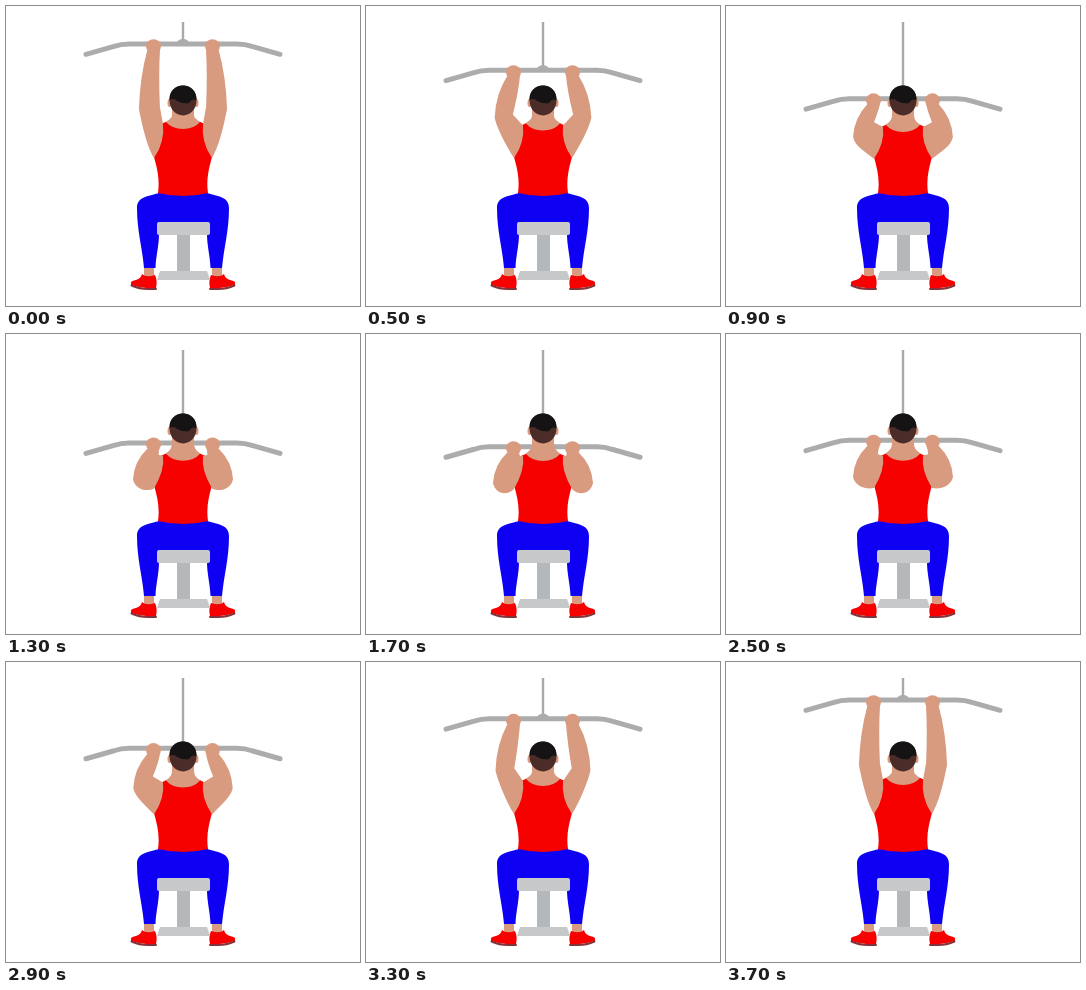
Write an HTML page that moves like this. It is 354x300 px and loops after 3.8 s.

```html
<!DOCTYPE html>
<html lang="en">
<head>
<meta charset="utf-8">
<title>Lat pulldown</title>
<style>
  html, body { margin: 0; width: 100%; height: 100%; overflow: hidden; background: #fff; }
  svg { display: block; width: 100%; height: 100%; }
  .skin { fill: #d99b7f; }
  .red { fill: #f60000; }
  .blue { fill: #0e00f2; }
  .metal { fill: #c6c8ca; }
</style>
</head>
<body>
<svg viewBox="0 0 354 300">
  <path id="cable" stroke="#aaa" stroke-width="2.400"/>
  <g id="bar">
    <path d="M80 10L108 2Q115 -.4 123 -.4H231Q239 -.4 246 2L274 10" fill="none" stroke="#acacac" stroke-width="5" stroke-linecap="round"/>
    <path d="M170.500 0C171-7 183-7 183.500 0Z" fill="#acacac"/>
  </g>

  <g id="leg">
    <path class="skin" d="M138 260H148V273H138Z"/>
    <path class="red" d="M125 276C129 273 134 275 136 268Q140 272 149 269C151 273 151 278 150 282H140Q131 281 125 279Z"/>
    <path d="M125.500 279.500Q133 283 142 283H150" fill="none" stroke="#85343a" stroke-width="2" stroke-linecap="round"/>
    <path class="blue" d="M178 187H153C144 190 131 190 131 202C131 225 136 240 138 262H149.500C150 249 153 240 153 228V217H178Z"/>
  </g>
  <use href="#leg" transform="matrix(-1 0 0 1 354 0)"/>

  <path d="M171 227H184V267H171Z" fill="#b5b8ba"/>
  <path class="metal" d="M154 265H201L204 274H151Z"/>
  <rect class="metal" x="151" y="216" width="53" height="13" rx="2"/>

  <path id="neck" class="skin"/>
  <path id="shirt" class="red"/>

  <g id="side">
    <path id="arm" class="skin"/>
    <ellipse id="hand" class="skin" cx="147.500" rx="7.500" ry="7"/>
    <ellipse class="skin" cx="163.500" cy="97" rx="2" ry="4"/>
  </g>
  <use href="#side" transform="matrix(-1 0 0 1 354 0)"/>

  <ellipse cx="177" cy="94.500" rx="13.500" ry="15" fill="#4b2c28"/>
  <path d="M163.500 94C163 85 169 79.500 177 79.500S191 85 190.500 94Q186 92 183 97Q175 98 170 94Q167 92 163.500 94Z" fill="#151314"/>
</svg>
<script>
const LOOP = 3800, STEP = 100, TOP = 38, PULL = 75.3;
const $ = id => document.getElementById(id);
const setPath = (id, d) => $(id).setAttribute("d", d);

// 0 with the arms stretched, 1 with the bar at the neck.
function pull(t) {
  const s = (t + 50) % LOOP;
  const d = Math.min(s, LOOP - s) / (LOOP / 2 - 50);
  const u = 1 - Math.max(0, 1 - d) ** 1.47;
  return (1 - Math.cos(Math.PI * u)) / 2;
}

// Left arm: wrist, elbow, armpit, shoulder, inner elbow, wrist.
function arm(y, p) {
  const elbowX = 127 + 6 * (1 - p) ** 3, elbowY = 103 + 46 * p ** 1.6;
  const foldX = 154 - 8 * Math.sin(Math.PI * p), foldY = 101 + 21 * p;
  const sag = p ** 4;
  return `M141.500 ${y + 5}Q${elbowX + 1} ${(y + elbowY) / 2} ${elbowX} ${elbowY}` +
    `C${elbowX + 2} ${elbowY + 10} 140 ${139 + 24 * sag} 148 ${152 + 3 * sag}` +
    `Q159 136 157 ${118 + 4 * p}L${foldX} ${foldY}` +
    `Q152.500 ${(y + foldY) / 2} 154 ${y + 5}Z`;
}

function draw() {
  const p = pull(Math.floor(performance.now() / STEP) * STEP % LOOP);
  const y = TOP + PULL * p, a = 117 + 4 * p;
  setPath("cable", `M177 16V${y}`);
  $("bar").setAttribute("transform", `translate(0 ${y})`);
  $("hand").setAttribute("cy", y + 2 - p);
  setPath("arm", arm(y, p));
  setPath("neck",
    `M166 102V109C166 ${a - 3} 159 ${a - 2} 155 ${a + 2}V${a + 15}H199V${a + 2}C195 ${a - 2} 188 ${a - 3} 188 109V102Z`);
  setPath("shirt",
    `M155 ${a + 1}L160 ${a - 1}Q166 ${a + 6} 177 ${a + 6}T194 ${a - 1}L199 ${a + 1}` +
    `L200 140L206 151C203 162 200 173 202 187Q177 193 152 187C154 173 151 162 148 151L154 140Z`);
  requestAnimationFrame(draw);
}
draw();
</script>
</body>
</html>
```
